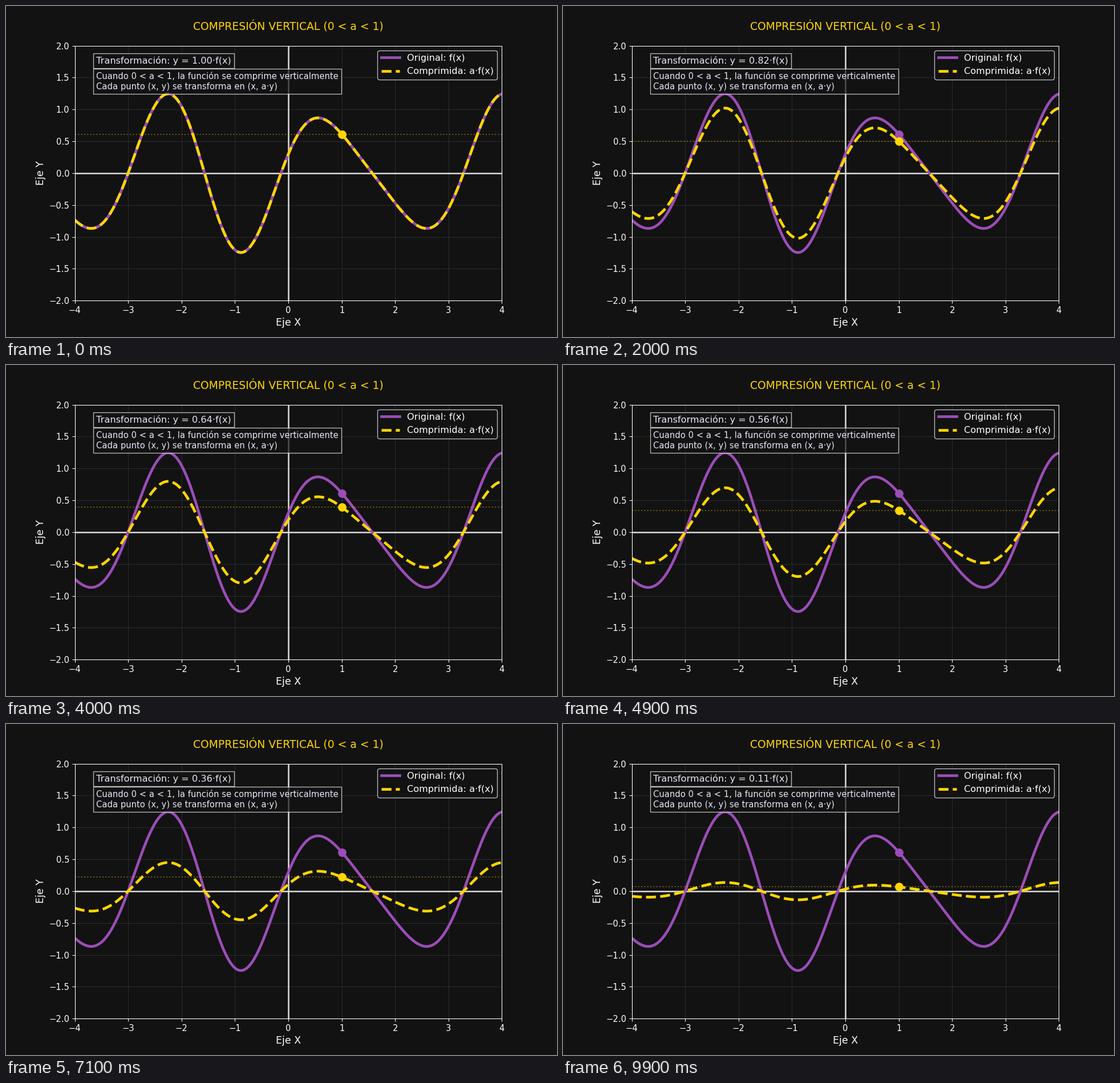
Recreate the animation shown at these times as a matplotlib script. Size 966 by 580 pixels, loop 10000 ms.

```python
import numpy as np
import matplotlib.pyplot as plt
from matplotlib.animation import FuncAnimation

BG, PURPLE, GOLD, PALE = "#121212", "#9B4DB8", "#FFD600", "#E6E6FA"
FRAMES = 100
PX = 1.0


def f(x):
    return np.sin(2 * x) + 0.3 * np.cos(3 * x)


plt.style.use("dark_background")
plt.rcParams["font.family"] = "DejaVu Sans"
fig, ax = plt.subplots(figsize=(10, 6.00415), dpi=96.6, facecolor=BG)
ax.set_facecolor(BG)
ax.set(xlim=(-4, 4), ylim=(-2, 2))
ax.set_title("COMPRESIÓN VERTICAL (0 < a < 1)", fontsize=14, color=GOLD, pad=20)
ax.set_xlabel("Eje X", fontsize=13)
ax.set_ylabel("Eje Y", fontsize=13)
ax.tick_params(labelsize=11)
ax.grid(color="white", alpha=0.1)
ax.axhline(0, color="white", lw=2, alpha=0.8)
ax.axvline(0, color="white", lw=2, alpha=0.8)

x = np.linspace(-4, 4, 1000)
ax.plot(x, f(x), color=PURPLE, lw=3.5, label="Original: f(x)")
curve, = ax.plot(x, f(x), "--", color=GOLD, lw=3.5, label="Comprimida: a·f(x)")
ax.plot([PX], [f(PX)], "o", color=PURPLE, ms=10)
dot, = ax.plot([PX], [f(PX)], "o", color=GOLD, ms=10)
level = ax.axhline(f(PX), color=GOLD, ls=":", lw=1.5, alpha=0.4)


def note(y, text, size):
    return ax.text(0.05, y, text, transform=ax.transAxes, fontsize=size, color=PALE,
                   bbox=dict(facecolor=BG, edgecolor="white", alpha=0.7))


formula = note(0.93, "", 12)
note(0.83, "Cuando 0 < a < 1, la función se comprime verticalmente\n"
           "Cada punto (x, y) se transforma en (x, a·y)", 11)
ax.legend(loc="upper right", fontsize=12, facecolor=BG, edgecolor=PALE)


def update(i):
    a = 1 - 0.9 * i / FRAMES
    curve.set_ydata(a * f(x))
    dot.set_ydata([a * f(PX)])
    level.set_ydata([a * f(PX)] * 2)
    formula.set_text(f"Transformación: y = {a:.2f}·f(x)")
    return curve, dot, level, formula


anim = FuncAnimation(fig, update, frames=FRAMES, interval=100, repeat=True, repeat_delay=0)
plt.show()
```
